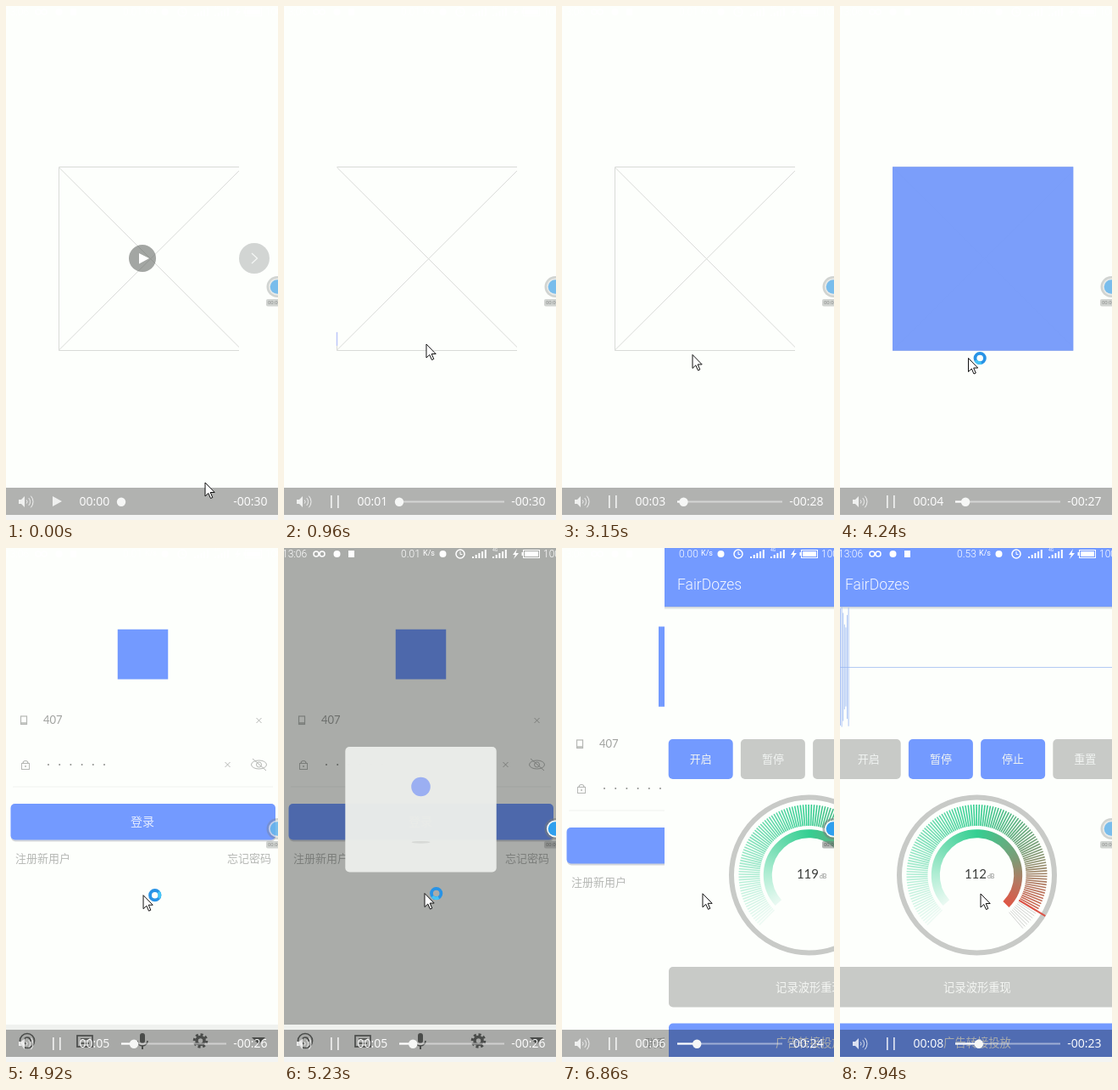
Write an HTML page with a canvas that moves like this. It is 321 px wide and 605 px high and loops after 8 s.

```html
<!DOCTYPE html>
<html lang="zh">
<head>
<meta charset="utf-8">
<style>
html, body { margin: 0; height: 100%; overflow: hidden; background: #fdfffc; }
canvas { display: block; }
</style>
</head>
<body>
<canvas id="stage" width="321" height="605"></canvas>
<script>
const c = document.getElementById('stage').getContext('2d');
const LOOP = 8000, BG = '#fdfffc', BLUE = '#739aff', GRAY = '#c8cac7';
const CJK = '"Noto Sans CJK SC", "Noto Sans CJK", sans-serif';
const TAU = Math.PI * 2;

const steps = [0];
for (const [a, b] of [[120, 1110], [1260, 2190], [2340, 3270], [3540, 4500],
                      [4620, 5630], [5770, 6710], [6860, 7790]])
  for (let k = 0; k < 8; k++) steps.push(a + (b - a) * k / 7);
steps.push(7940);

const clamp = x => Math.max(0, Math.min(1, x));
const ramp = (t, a, b) => clamp((t - a) / (b - a));
const lerp = (a, b, p) => a + (b - a) * p;

function rect(x, y, w, h, fill, r = 0) {
  c.beginPath();
  c.roundRect(x, y, w, h, r);
  c.fillStyle = fill;
  c.fill();
}
function disc(x, y, r, fill) {
  c.beginPath();
  c.arc(x, y, r, 0, TAU);
  c.fillStyle = fill;
  c.fill();
}
function arc(x, y, r, a, b, color, width) {
  c.beginPath();
  c.arc(x, y, r, a, b);
  c.strokeStyle = color;
  c.lineWidth = width;
  c.stroke();
}
function line(points, color, width = 1) {
  c.beginPath();
  points.forEach(([x, y]) => c.lineTo(x, y));
  c.strokeStyle = color;
  c.lineWidth = width;
  c.stroke();
}
function poly(points, fill) {
  c.beginPath();
  points.forEach(([x, y]) => c.lineTo(x, y));
  c.closePath();
  c.fillStyle = fill;
  c.fill();
}
function text(s, x, y, font, fill, align = 'left') {
  c.font = font;
  c.fillStyle = fill;
  c.textAlign = align;
  c.textBaseline = 'middle';
  c.fillText(s, x, y);
}
function cross(x, y, r, color) {
  line([[x - r, y - r], [x + r, y + r]], color);
  line([[x + r, y - r], [x - r, y + r]], color);
}

function splash(t) {
  const gray = '#d9dbd8';
  line([[62.5, 189.5], [275, 189.5]], gray);
  line([[62.5, 190], [275, 401.5]], gray);
  line([[62.5, 405], [275, 194]], gray);
  const edge = [[275, 405.5], [62.5, 405.5], [62.5, 190]];
  const len = t < 120 ? 428 : 372 + (t - 1658) * 0.2;
  c.setLineDash([len, 999]);
  line(edge, gray);
  if (t >= 120 && len < 428) {
    c.setLineDash([0, len - 16, 16, 999]);
    line(edge, '#b9c4fa', 1.4);
  }
  c.setLineDash([]);
  c.globalAlpha = 0.97 * ramp(t, 3500, 4200);
  rect(62, 189.3, 213.4, 216.4, '#779bfa');
  c.globalAlpha = 1;
}

function login(t) {
  const p = ramp(t, 5250, 5600), dy = lerp(-28, 0, p), ink = '#b6b8b5';
  const size = lerp(59.5, 95, p);
  rect(161.5 - size / 2, lerp(95.7, 92.5, p), size, size - 0.7, BLUE);

  c.strokeStyle = ink;
  c.lineWidth = 1.2;
  c.strokeRect(17.5, 226 + dy, 7, 9.5);
  line([[18, 234 + dy], [24, 234 + dy]], ink, 1.5);
  text('407', 44, 231.5 + dy, '13px Lato, sans-serif', '#a0a29f');
  cross(298.5, 231 + dy, 3, ink);

  c.strokeStyle = ink;
  c.strokeRect(18.5, 281.5 + dy, 9, 7);
  arc(23, 281.5 + dy, 3, Math.PI, TAU, ink, 1.2);
  disc(23, 285 + dy, 1, ink);
  for (let i = 0; i < 6; i++) disc(50 + i * 13.2, 283 + dy, 1, '#8f918e');
  cross(261.5, 283 + dy, 3, ink);
  c.beginPath();
  c.ellipse(298.5, 283 + dy, 9, 5, 0, 0, TAU);
  c.stroke();
  arc(298.5, 283 + dy, 3, 0, TAU, ink, 1);
  line([[291, 276 + dy], [307, 290 + dy]], ink);
  line([[8, 309 + dy], [315, 309 + dy]], '#f0f2ef');

  rect(6, 331 + dy, 312, 42.5, '#d3d6da', 5);
  rect(5.5, 329 + dy, 312.5, 42.5, BLUE, 5);
  text('登录', 161, 350 + dy, '14px ' + CJK, '#e6edff', 'center');
  text('注册新用户', 11, 393 + dy, '13px ' + CJK, ink);
  text('忘记密码', 313, 393 + dy, '13px ' + CJK, ink, 'right');
  text('联系客服', 150, 582, '13px ' + CJK, ink, 'right');
  text('关于我们', 172, 582, '13px ' + CJK, ink);
}

function keyboardBar(t) {
  const p = ramp(t, 5250, 5480);
  if (p === 1) return;
  const ink = '#6a6c6a';
  c.save();
  c.translate(0, p * 44);
  rect(0, 561, 321, 44, '#f0f2ef');
  arc(25, 580, 8.5, 0, TAU, ink, 1.7);
  arc(25, 580, 4, 2, 6.5, ink, 1.7);
  c.lineWidth = 1.7;
  c.strokeRect(84, 574, 18, 13);
  line([[88, 578], [98, 578]], ink, 1.7);
  line([[88, 583], [98, 583]], ink, 1.7);
  rect(158, 571, 6, 12, ink, 3);
  arc(161, 580, 6, 0, Math.PI, ink, 1.6);
  line([[161, 586], [161, 590]], ink, 2);
  c.setLineDash([3, 2.7]);
  arc(229.5, 580, 7.3, 0, TAU, ink, 3);
  c.setLineDash([]);
  arc(229.5, 580, 4.5, 0, TAU, ink, 3.5);
  poly([[290, 576], [306, 576], [298, 584]], ink);
  c.restore();
}

function loader(t) {
  c.globalAlpha = 0.97 * ramp(t, 5030, 5190) + 0.03 * ramp(t, 5200, 5400);
  rect(72.3, 234, 178.4, 147.5, '#eceeeb', 5);
  // Fall, throw back while morphing to a square, fall again.
  const up = ramp(t, 6000, 6500);
  const fall = t < 6250 ? ramp(t, 5500, 6000) : ramp(t, 6500, 7000);
  const thrown = t >= 6000 && t < 6500;
  const drop = thrown ? (1 - up) ** 2.4 : fall ** 2.4;
  const shade = thrown ? 0.2 + 0.8 * up : 1 - 0.8 * fall;
  const mix = (a, b) => Math.round(lerp(a, b, up));
  c.save();
  c.translate(161.5, 281 + 50 * drop);
  c.rotate(Math.PI * up);
  rect(-11.3, -11.3, 22.6, 22.6,
    `rgb(${mix(152, 238)},${mix(172, 148)},${mix(242, 138)})`, 11.3 * (1 - up));
  c.restore();
  c.beginPath();
  c.ellipse(161.5, 346.3, 11 * shade, 1.4, 0, 0, TAU);
  c.fillStyle = '#d6d8d5';
  c.fill();
  c.globalAlpha = 1;
}

function gauge(value) {
  const x = 161.5, y = 385, start = Math.PI * 0.75, sweep = Math.PI * 274 / 180;
  const fade = c.createConicGradient(start, x, y);
  [[0, '#eefaf4'], [0.12, '#b4eed6'], [0.25, '#6fdcb0'], [0.375, '#34cf92'],
   [0.56, '#7c9c76'], [0.66, '#b8755f'], [0.77, '#e8503f'], [1, '#eefaf4']]
    .forEach(([p, color]) => fade.addColorStop(p, color));
  arc(x, y, 91.5, 0, TAU, GRAY, 6);
  arc(x, y, 48.7, start + 0.05, start + Math.PI * 1.5, fade, 10);
  const tick = (i, r1, r2, color, w) => {
    const a = start + sweep * i / 120, cos = Math.cos(a), sin = Math.sin(a);
    line([[x + r1 * cos, y + r1 * sin], [x + r2 * cos, y + r2 * sin]], color, w);
  };
  for (let i = 0; i <= 120; i++)
    tick(i, 58, 83, i <= value ? fade : '#c4c6c3', i <= value ? 1.6 : 0.8);
  tick(value, 58, 94, '#dc5347', 2);
  text(value, 173, 384.5, '15px Lato, sans-serif', '#3c3e3c', 'right');
  text('dB', 174, 387, '7px Lato, sans-serif', '#8a8c89');
}

function mainPage(t) {
  const on = t > 7600;
  c.save();
  c.translate(130 * (1 - ramp(t, 6860, 7140)) ** 2, 0);
  rect(-9, 0, 360, 605, BG);
  rect(-9, 69, 360, 1.5, '#c3cbd8');
  rect(-9, 70.5, 360, 1.5, '#e8ece9');
  rect(-9, 0, 360, 69, BLUE);
  text('FairDozes', 6, 44, '300 17.5px Roboto, sans-serif', '#f4f7ff');
  if (on) {
    line([[0, 140.5], [321, 140.5]], '#b3cbf3');
    const end = Math.min(11, (t - 7700) * 0.046);
    for (let x = 0; x < end; x += 1.6) {
      const h = 40 + 31 * Math.abs(Math.sin(x * 2.3 + 1.2));
      line([[x + 0.5, 140 - h], [x + 0.5, 140 + h]], '#9ab6f3', 0.8);
    }
  }
  ['开启', '暂停', '停止', '重置'].forEach((label, i) => {
    const x = -4.3 + i * 85.2;
    const active = on ? i === 1 || i === 2 : i === 0;
    rect(x, 225, 76, 47, active ? BLUE : GRAY, 5);
    text(label, x + 38, 248.5, '13px ' + CJK, '#f1f4f2', 'center');
  });
  gauge(on ? 112 + Math.round(3 * Math.abs(Math.sin((7940 - t) / 90))) : 119);
  rect(-4, 493, 331, 47.5, GRAY, 5);
  text('记录波形重现', 162, 517, '13.3px ' + CJK, '#f4f6f3', 'center');
  rect(-4, 559.5, 331, 47, BLUE, 5);
  text('广告转接投放', 162, 582, '13.3px ' + CJK, '#f4f6f3', 'center');
  c.restore();
}

function statusBar(t) {
  const w = '#fff', font = '300 12px Roboto, sans-serif';
  text('13:06', -2, 7, font, w);
  arc(38, 7, 3, 0, TAU, w, 1.5);
  arc(45, 7, 3, 0, TAU, w, 1.5);
  disc(62.5, 7, 4, w);
  rect(76, 3, 7, 8, w);
  text(t < 6860 ? '0.01' : t < 7300 ? '0.00' : '0.53', 138, 7, font, w);
  text('K/s', 164, 6, '9px Roboto, sans-serif', w);
  disc(187.5, 7, 4, w);
  arc(208, 7, 5, 0, TAU, w, 1.5);
  line([[208, 4], [208, 7.5], [210.5, 7.5]], w);
  for (const x of [222, 246])
    for (let i = 0; i < 5; i++) rect(x + i * 3.7, 10 - i * 2, 2, 2 + i * 2, w);
  text('4G', 246, 3, '5px Roboto, sans-serif', w);
  poly([[275, 1], [270, 8], [273, 8], [271, 13], [277, 6], [273.5, 6]], w);
  c.strokeStyle = w;
  c.lineWidth = 1;
  c.strokeRect(282.5, 2.5, 19, 9);
  rect(284, 4, 16, 6, w);
  rect(280.5, 5, 2, 4, w);
  text('100', 306, 7, font, w);
}

// Floating button: solid while in use, translucent when idle.
function bubble(t) {
  c.globalAlpha = t >= 5000 && t < 7200 ? 1 : 0.6;
  disc(320, 330.5, 12.5, 'rgba(120,124,122,.55)');
  disc(320, 330.5, 10, '#f8faf8');
  disc(320, 330.5, 8.3, '#2f9fee');
  rect(307, 345, 20, 8.5, 'rgba(120,124,122,.55)', 2);
  text('00:00', 309, 349.5, '6px Roboto, sans-serif', '#5d5f5d');
  c.globalAlpha = 1;
}

function player(t) {
  const w = '#fff', soft = 'rgba(255,255,255,.8)', font = '14px "Open Sans", sans-serif';
  const playing = t >= 120, time = playing ? t / 1000 + 0.1 : 0;
  const clock = s => '00:' + String(s).padStart(2, '0');
  rect(0, 567, 321, 32, 'rgba(0,0,0,.3)');
  rect(0, 599, 321, 6, '#f3f4f3');
  poly([[15, 581], [18, 581], [22, 577], [22, 590], [18, 586], [15, 586]], soft);
  [3, 6.5, 10].forEach(r => arc(22, 583.5, r, -0.75, 0.75, soft, 1));
  if (playing) {
    rect(55, 576, 1.7, 15, soft);
    rect(63, 576, 1.7, 15, soft);
  } else poly([[55, 577], [66, 583], [55, 589]], soft);
  text(clock(Math.floor(time)), 86.5, 584, font, w);
  const x = Math.max(136, 129.8 + 4.23 * time);
  if (playing) {
    line([[136, 583.5], [260, 583.5]], 'rgba(255,255,255,.45)', 2);
    line([[136, 583.5], [x, 583.5]], w, 2);
  }
  disc(x, 583.8, 5.2, '#f6f7f6');
  text('-' + clock(Math.min(30, Math.ceil(30.9 - time))), 308.5, 584, font, w, 'right');
  if (!playing) {
    disc(161, 297, 16, 'rgba(90,92,90,.55)');
    poly([[157, 291], [169, 297], [157, 303.5]], w);
  }
  if (t < 400) {
    disc(293, 297, 18, '#d2d5d3');
    line([[290, 291], [296.5, 297], [290, 303]], '#f4f6f4', 1.3);
  }
}

const track = [[0, 235, 561], [120, 235, 561], [1000, 165.5, 392], [2400, 165.5, 392],
               [3300, 151.5, 414.5], [4400, 151.5, 414.5], [5100, 166, 406.5], [8000, 166, 407]];
function pointer(t) {
  const i = track.findIndex(k => k[0] > t);
  const [a, x1, y1] = track[i - 1], [b, x2, y2] = track[i];
  const p = ramp(t, a, b);
  c.save();
  c.translate(lerp(x1, x2, p), lerp(y1, y2, p));
  const shape = [[0, 0], [0, 16], [3.8, 12.5], [6.5, 18.5], [8.8, 17.5], [6.2, 11.5], [11.2, 11.5]];
  poly(shape, '#fff');
  line([...shape, [0, 0]], '#111');
  if (t > 3600 && t < 5600) {
    arc(13.7, 0, 5.7, 0, TAU, '#2893e6', 3.8);
    const spin = t / 160;
    arc(13.7, 0, 5.7, spin, spin + 1.4, '#45c4f5', 3.8);
  }
  c.restore();
}

function draw(t) {
  rect(0, 0, 321, 605, BG);
  if (t < 4700) splash(t);
  else if (t < 7140) login(t);
  if (t >= 6860) mainPage(t);
  if (t >= 4700 && t < 6860) {
    rect(0, 0, 321, 605, `rgba(0,5,0,${0.6 * ramp(t, 5000, 5360)})`);
    loader(t);
    keyboardBar(t);
  }
  bubble(t);
  statusBar(t);
  player(t);
  pointer(t);
}

const begin = performance.now();
function frame() {
  const now = (performance.now() - begin) % LOOP;
  draw(steps.findLast(s => s <= now + 15));
  requestAnimationFrame(frame);
}
frame();
</script>
</body>
</html>
```
